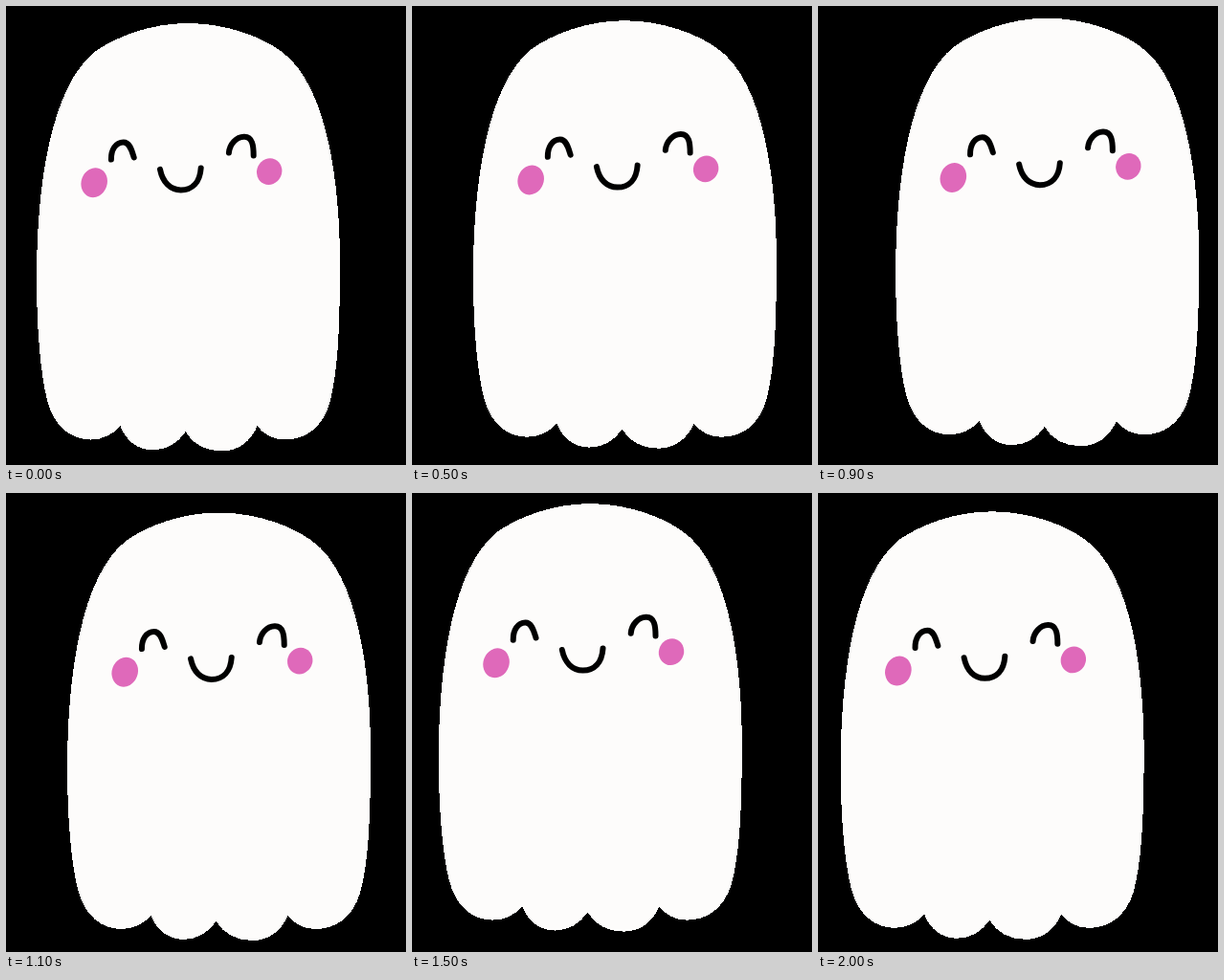
An HTML page for the animation above (2.1 s loop, 418 px wide and 480 px high).

```html
<!DOCTYPE html>
<html lang="en">
<head>
<meta charset="utf-8">
<title>Floating ghost</title>
<style>
  html, body { margin: 0; width: 100%; height: 100%; overflow: hidden; background: #000; }
  svg { display: block; width: 100%; height: 100%; }
</style>
</head>
<body>
<svg viewBox="0 0 418 480">
  <g id="ghost">
    <path fill="#fdfcfb" shape-rendering="crispEdges" d="M190 18
      C150 18 114 33 94 47 C46 84 32 190 32 285
      C32 335 36 385 43 412 C50 440 68 453.5 88.5 453.5
      C101 453.5 112 448 119.5 439.3 C125 454 137 464.4 153.7 464.4
      C168 464.4 180 457 187.6 445.3 C195 458 208 465.5 225.6 465.5
      C243 465.5 256 455 262.6 439.3 C269 448 279 453.5 291.5 453.5
      C312 453.5 330 442 338 416 C346 386 349 345 349 270
      C349 190 337 82 287 47 C268 33 231 18 190 18Z"/>
    <g transform="translate(.7 .4)">
      <g fill="#df69ba">
        <ellipse rx="13.5" ry="15.7" transform="translate(91.5 184.3) rotate(20)"/>
        <ellipse rx="13" ry="14" transform="translate(274.5 172.7) rotate(25)"/>
      </g>
      <g fill="none" stroke="#000" stroke-width="6" stroke-linecap="round" stroke-linejoin="round">
        <path d="M109.2 160.2 C109 150 114 142 122 142 C129 142 131 152 133 158"/>
        <path d="M232.2 153.2 C233 144 240 136.5 248 136.3 C257 136 258 146 258 156"/>
        <path d="M160.3 170.5 C163 184 171 192 182 192 C194 192 202 184 203 169"/>
      </g>
    </g>
  </g>
</svg>
<script>
  const LOOP = 2100, STEP = 100;
  const ghost = document.getElementById('ghost');

  // Smooth looping curve through [time, value] key points.
  function loopCurve(keys) {
    const count = keys.length;
    const key = i => {
      const [time, value] = keys[(i + count) % count];
      return [time + Math.floor(i / count) * LOOP, value];
    };
    const slope = i => {
      const [t0, v0] = key(i - 1), [t1, v1] = key(i + 1);
      return (v1 - v0) / (t1 - t0);
    };
    return time => {
      const i = keys.findLastIndex(([t]) => t <= time);
      const [t0, v0] = key(i), [t1, v1] = key(i + 1);
      const span = t1 - t0, u = (time - t0) / span, w = 1 - u;
      return w * w * ((1 + 2 * u) * v0 + u * span * slope(i))
           + u * u * ((1 + 2 * w) * v1 - w * span * slope(i + 1));
    };
  }

  const drift = loopCurve([[0, 0], [200, 8], [600, 40], [800, 54], [1200, 23], [1300, 12], [1800, -21]]);
  // Turning points of the vertical bob.
  const bob = loopCurve([[0, 0], [355, -8], [600, 0.3], [830, -7], [1100, 2.5],
    [1480, -7], [1700, 0.9], [1880, -3], [2020, 1.8]]);

  function render(time) {
    const held = Math.floor((time % LOOP) / STEP) * STEP;
    ghost.setAttribute('transform', `translate(${drift(held)} ${bob(held)})`);
  }

  const start = performance.now();
  function tick() {
    render(performance.now() - start);
    requestAnimationFrame(tick);
  }
  tick();
</script>
</body>
</html>
```
